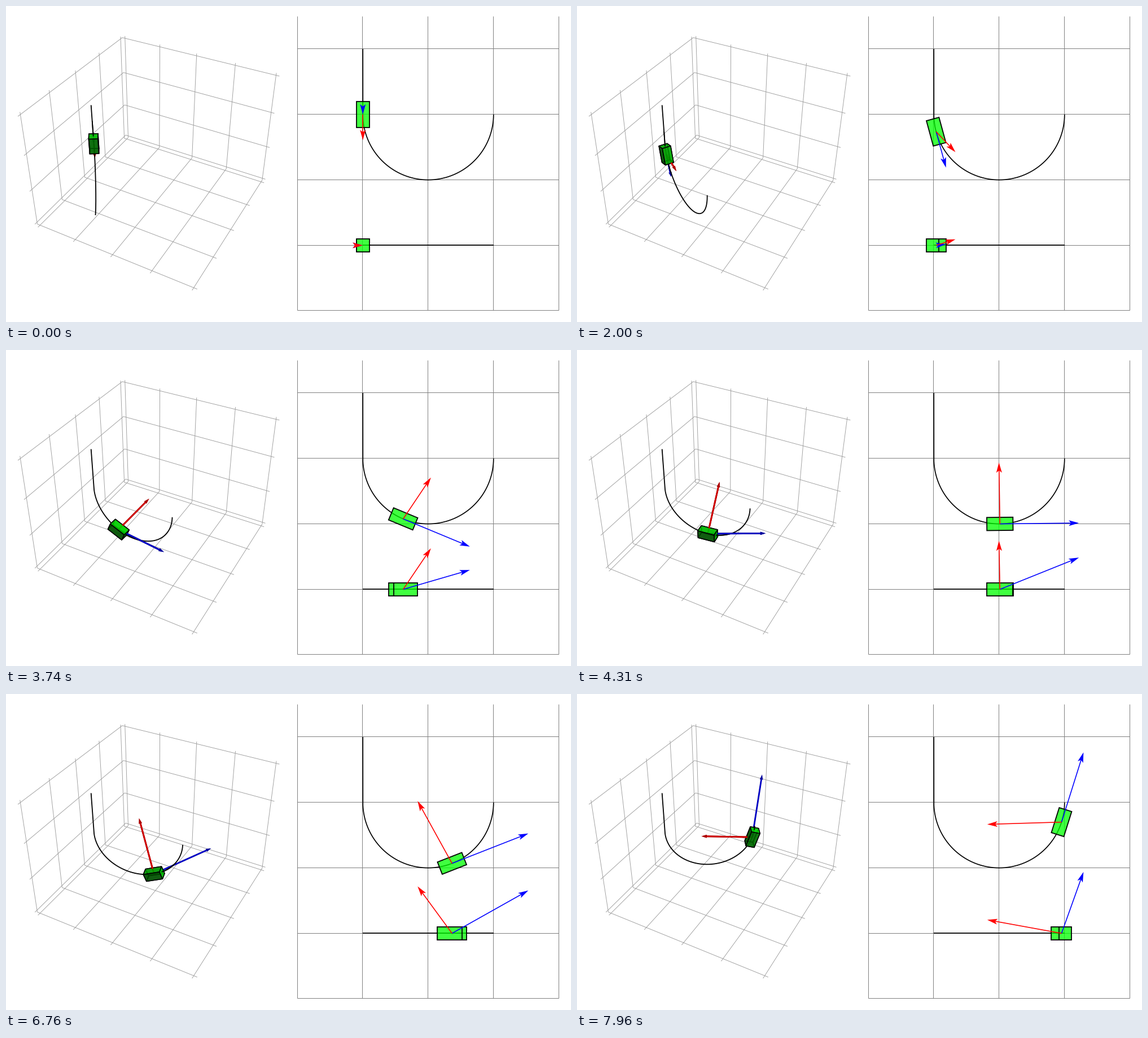
A matplotlib script that plays this animation: 1001 px wide and 559 px high, repeating every 7.99 s.

```python
import numpy as np
import matplotlib.pyplot as plt
from matplotlib.animation import FuncAnimation
from matplotlib.collections import LineCollection
from matplotlib.lines import Line2D
from matplotlib.patches import Polygon

W, H, DPI = 1001, 559, 64
PX = 72 / DPI                        # one pixel in points
INTERVAL, LOOP = 17, 7990

# bead on a semicircular track of radius 1 that turns about its vertical axis
G, OMEGA, DT = 9.81, 1.92, 0.00458
START = np.radians(-58)
V_SCALE, A_SCALE = 0.25, 0.04
HALF = np.array([0.2, 0.1, 0.1])     # half sizes of the cart
PAUSE_STEP = 128

BLUE, RED = "#0000ff", "#ff0000"

# flat views
UNIT, X0, Z0 = 115.8, 632.2, 191.8
Y0 = Z0 + 2 * UNIT
GRID_SHIFT = -0.8                    # hairlines fall on the pixel before

# perspective view
LO, HI = np.array([-1, -1, -2]), np.array([3, 3, 1])
PAD = 0.02 * (HI - LO)
BOX_LO, BOX_HI = LO - PAD, HI + PAD
CENTER = (LO + HI) / 2
VIEW = np.array([1.3, -2.4, 2.0])
DIST = np.linalg.norm(VIEW) * (BOX_HI - BOX_LO).max()
FWD = -VIEW / np.linalg.norm(VIEW)
RIGHT = np.cross(FWD, [0, 0, 1])
RIGHT /= np.linalg.norm(RIGHT)
UP = np.cross(RIGHT, FWD)
EYE = CENTER - DIST * FWD
FOCAL, CX, CY = 1081, 264.6, 257
LIGHT = (RIGHT + UP - FWD) / np.sqrt(3)


def project(p):
    d = np.asarray(p, float) - CENTER
    k = FOCAL / (DIST + d @ FWD)
    return np.stack([CX + k * (d @ RIGHT), CY - k * (d @ UP)], axis=-1)


def angular_acc(th):
    return G * np.cos(th) + OMEGA**2 * (1 - np.cos(th)) * np.sin(th)


def simulate(steps, sub=10):
    th, w, h = 0.0, 0.0, DT / sub
    out = [(th, w)]
    for _ in range(steps):
        for _ in range(sub):
            w += angular_acc(th) * h / 2
            th += w * h
            w += angular_acc(th) * h / 2
        out.append((th, w))
    return out


def step_at(ms):
    if ms < 500:
        return 0
    if ms < 6310:
        return min(PAUSE_STEP, (ms - 500) // 30 + 1)
    return (ms - 6310) // 30 + PAUSE_STEP + 1


STATES = simulate(200)


def track_point(th):
    th = np.asarray(th, float)
    return np.stack([1 - np.cos(th), 0 * th, -np.sin(th)], axis=-1)


ARC = track_point(np.linspace(0, np.pi, 361))
TRACK = np.vstack([[0, 0, 1], ARC])

fig = plt.figure(figsize=(W / DPI, H / DPI), dpi=DPI, facecolor="white")
ax = fig.add_axes([0, 0, 1, 1])
ax.set_xlim(0, W)
ax.set_ylim(H, 0)
ax.axis("off")

moving = []


def line(pts, color="black", width=1.7, z=2, keep=False):
    pts = np.asarray(pts)
    art = Line2D(pts[:, 0], pts[:, 1], color=color, lw=width * PX, zorder=z,
                 solid_capstyle="butt", solid_joinstyle="round")
    ax.add_line(art)
    if not keep:
        moving.append(art)


def shape(pts, face, edge="none", width=0.0, z=3):
    art = Polygon(pts, closed=True, fc=face, ec=edge, lw=width * PX, zorder=z,
                  joinstyle="miter")
    ax.add_patch(art)
    moving.append(art)


def flat(p, vertical):
    """Side view for vertical=2, top view for vertical=1."""
    p = np.asarray(p)
    base = Z0 if vertical == 2 else Y0
    return np.stack([X0 + UNIT * p[..., 0], base - UNIT * p[..., vertical]], axis=-1)


def draw_backdrop():
    ticks = UNIT * np.arange(-1, 4) + GRID_SHIFT
    xs, ys = X0 + ticks, Z0 + ticks
    segs = [[(x, 18), (x, ys[-1])] for x in xs]
    segs += [[(xs[0], y), (xs[-1], y)] for y in ys]
    ax.add_collection(LineCollection(segs, colors="#808080", lw=PX, zorder=1))

    walls = {0: BOX_LO[0], 1: BOX_HI[1], 2: BOX_LO[2]}
    segs = []
    for fixed, value in walls.items():
        a, b = [i for i in range(3) if i != fixed]
        for i, j in ((a, b), (b, a)):
            for tick in range(LO[i], HI[i] + 1):
                ends = np.zeros((2, 3))
                ends[:, fixed], ends[:, i] = value, tick
                ends[:, j] = BOX_LO[j], BOX_HI[j]
                segs.append(project(ends))
    ax.add_collection(LineCollection(segs, colors="#9c9c9c", lw=0.9 * PX, zorder=1))

    line(flat(TRACK, 2), z=2, keep=True)
    line(flat(ARC, 1), z=2, keep=True)


def arrow(tail, delta, color, default, z):
    size = np.hypot(*delta)
    d = delta / size if size > 1e-6 else np.array(default, float)
    n = np.array([-d[1], d[0]])
    tip = tail + delta
    if size > 13:
        line([tail, tip - 13 * d], color, 1.6, z)
    back = tip - 18 * d
    shape([tip, back + 5 * n, tip - 14 * d, back - 5 * n], color, z=z)


def tube(a, b, d, colors, z, head=0.12):
    """Shaded arrow in space from a to b along unit vector d."""
    tip, neck = project(b), project(b - head * d)
    if (b - a) @ d > head:
        ends = [project(a), neck]
        line(ends, colors[0], 2.8, z)
        line(ends, colors[1], 1.6, z)
    s = tip - neck
    n = np.array([-s[1], s[0]]) / max(np.hypot(*s), 1e-6)
    shape([tip, neck + 2.8 * n, neck - 2.8 * n], colors[0], z=z)


def space_track(pts, z):
    """Track in space, cut off at the limits of the plot box."""
    inside = np.all((pts >= BOX_LO) & (pts <= BOX_HI), axis=1)
    line(np.where(inside[:, None], project(pts), np.nan), width=1.8, z=z)


def flat_views(pos, basis, vel, acc):
    tang, norm = basis[0] * HALF[0], basis[2] * HALF[2]
    corners = pos + np.array([tang + norm, tang - norm, -tang - norm, norm - tang])
    green = (0, 1, 0, 0.75)
    shape(flat(corners, 2), green, "black", 1.8)

    left, right = corners[:, 0].min(), corners[:, 0].max()
    crest = corners[corners[:, 2].argmax(), 0]
    box = [(left, -0.1), (right, -0.1), (right, 0.1), (left, 0.1)]
    shape([(X0 + UNIT * x, Y0 + UNIT * y) for x, y in box], green, "black", 1.8)
    line([(X0 + UNIT * crest, Y0 + s * UNIT * 0.1) for s in (-1, 1)], width=1.8, z=3)

    for view, default in ((2, (0, 1)), (1, (1, 0))):
        tail = flat(pos, view)
        for vec, color, z in ((vel, BLUE, 4), (acc, RED, 5)):
            arrow(tail, flat(pos + vec, view) - tail, color, default, z)


def cart_faces(pos, basis):
    faces = []
    for i in range(3):
        u, v = (basis[j] * HALF[j] for j in range(3) if j != i)
        for sign in (-1, 1):
            normal = sign * basis[i]
            mid = pos + normal * HALF[i]
            quad = np.array([mid + u + v, mid + u - v, mid - u - v, mid - u + v])
            faces.append(((mid - EYE) @ FWD, normal, quad))
    return sorted(faces, key=lambda f: -f[0])


def space_view(th, angle, pos, basis, vel, acc):
    c, s = np.cos(angle), np.sin(angle)
    turn = np.array([[c, s, 0], [-s, c, 0], [0, 0, 1]])   # acts on row vectors
    space_track(TRACK @ turn, 2)
    center, axes = pos @ turn, basis @ turn

    for _, normal, quad in cart_faces(center, axes):
        shade = 0.32 + 0.62 * max(0.0, normal @ LIGHT)
        shape(project(quad), (0, shade, 0, 0.75), "black", 1.5, z=4)

    def faces_eye(normal, half):
        return normal @ (EYE - center - normal * half) > 0

    # piece of the track that leaves through a visible end of the cart
    for sign in (-1, 1):
        if faces_eye(sign * axes[0], HALF[0]):
            if sign > 0:
                piece = track_point(np.linspace(min(th + 0.2, np.pi),
                                                min(th + 0.6, np.pi), 9))
            else:
                angles = np.linspace(th - 0.6, th - 0.2, 9)
                piece = track_point(np.maximum(angles, 0))
                piece[:, 2] -= np.minimum(angles, 0)
            space_track(piece @ turn, 5)

    paints = ((vel, ("#00009c", "#0000d8")), (acc, ("#ac0000", "#e00000")))
    for vec, colors in paints:
        vec = vec @ turn
        size = np.linalg.norm(vec)
        d = vec / size if size > 1e-6 else axes[0]
        tip = center + vec
        tube(center, tip, d, colors, 1.5)
        comp = axes @ d
        reach = HALF / np.maximum(np.abs(comp), 1e-9)
        i = reach.argmin()
        if size > reach[i] and faces_eye(np.sign(comp[i]) * axes[i], HALF[i]):
            tube(center + reach[i] * d, tip, d, colors, 6)


def draw(frame):
    while moving:
        moving.pop().remove()
    n = step_at((frame + 1) * INTERVAL - 1)
    th, w = STATES[n]
    c, s = np.cos(th), np.sin(th)
    pos = track_point(th)
    basis = np.array([[s, 0, -c], [0, 1, 0], [c, 0, s]])
    vel = w * basis[0] + OMEGA * pos[0] * basis[1]
    acc = (angular_acc(th) * basis[0] + w**2 * basis[2]
           + 2 * OMEGA * w * s * basis[1] - OMEGA**2 * np.array([pos[0], 0, 0]))
    vel, acc = vel * V_SCALE, acc * A_SCALE
    flat_views(pos, basis, vel, acc)
    space_view(th, START + OMEGA * DT * n, pos, basis, vel, acc)
    return moving


draw_backdrop()
anim = FuncAnimation(fig, draw, frames=LOOP // INTERVAL, interval=INTERVAL,
                     init_func=lambda: moving, repeat=True, repeat_delay=0)
plt.show()
```
